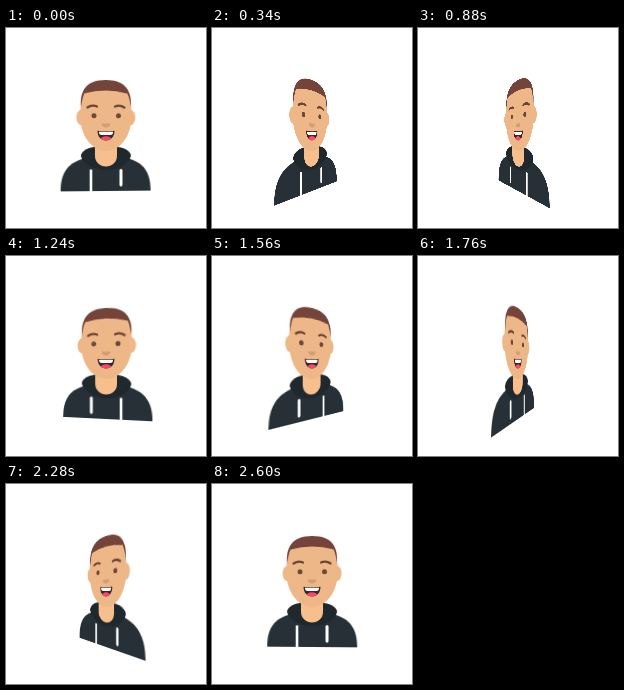
An HTML page that plays this animation: 200x200 px, repeating every 2.62 s.

```html
<!DOCTYPE html>
<html lang="en">
<head>
<meta charset="utf-8">
<title>Turning avatar</title>
<style>
  html, body { margin: 0; width: 100%; height: 100%; overflow: hidden; background: #fff; }
  .stage {
    position: relative; width: 200px; height: 200px; overflow: hidden;
    perspective: 160px; perspective-origin: 100px 107.5px;
  }
  .avatar {
    display: block; width: 200px; height: 200px;
    transform-origin: 100px 107.5px;
    animation: turn 2620ms linear -10ms infinite;
  }
  @keyframes turn {
    from { transform: rotateY(0deg); }
    to { transform: rotateY(360deg); }
  }
  .skin { fill: #edb788; }
  .neck { fill: #f7bf8d; }
  .shade { fill: #d39d75; }
  .hair { fill: #74433a; }
  .cloth { fill: #273036; }
  .hood { fill: #1f282d; }
  .brow { fill: none; stroke: #6b4437; stroke-width: 2.2; stroke-linecap: round; }
  .eye { fill: #6b4a3a; }
  .cord { stroke: #fff; }
</style>
</head>
<body>
<div class="stage">
  <svg class="avatar" viewBox="0 0 200 200">
    <!-- hoodie -->
    <path class="cloth" d="M55 163C55 147 60 136 76 131L88 124H112L124 131C140 136 145 147 145 163Z"/>
    <path class="hood" d="M88 119C80 120 75 124 75 128C77 136 88 142 100 142S123 136 125 128C125 124 120 120 112 119Z"/>
    <path class="cord" d="M85 141.5V163" stroke-width="2.6"/>
    <path class="cord" d="M115 142.5V157" stroke-width="3" stroke-linecap="round"/>
    <!-- neck and head -->
    <path class="neck" d="M89 112H111V128C111 134 106 138.5 100 138.5S89 134 89 128Z"/>
    <ellipse class="skin" cx="75" cy="89.5" rx="4.5" ry="7.5"/>
    <ellipse class="skin" cx="125" cy="89.5" rx="4.5" ry="7.5"/>
    <path class="skin" d="M76 66Q100 54 124 66L126 86C126 108 114 123 100 123S74 108 74 86Z"/>
    <path class="hair" d="M75 79C74 63 80 52 100 52S126 63 125 79C124 74 123.5 70 121.500 65.500Q100 59.500 78.500 65.500C76.500 70 76 74 75 79Z"/>
    <!-- features -->
    <path class="brow" d="M81.500 79.500Q86 76.500 91 78.500M118.500 79.500Q114 76.500 109 78.500"/>
    <circle class="eye" cx="88" cy="87.700" r="2.500"/>
    <circle class="eye" cx="112.500" cy="87.700" r="2.500"/>
    <path class="shade" d="M95.500 95.500H104.500Q104 99.500 100 99.500T95.500 95.500Z"/>
    <clipPath id="lips"><path d="M91.500 102.700Q100 104 108.500 102.700C108.500 108.500 105 112.500 100 112.500S91.500 108.500 91.500 102.700Z"/></clipPath>
    <g clip-path="url(#lips)">
      <rect x="90" y="101" width="20" height="13" fill="#3a2829"/>
      <path d="M93 103.800H107V105Q106.500 107 104.500 107H95.500Q93.500 107 93 105Z" fill="#fff"/>
      <ellipse cx="100" cy="111.500" rx="5.500" ry="3.300" fill="#fb4766"/>
    </g>
  </svg>
</div>
</body>
</html>
```
